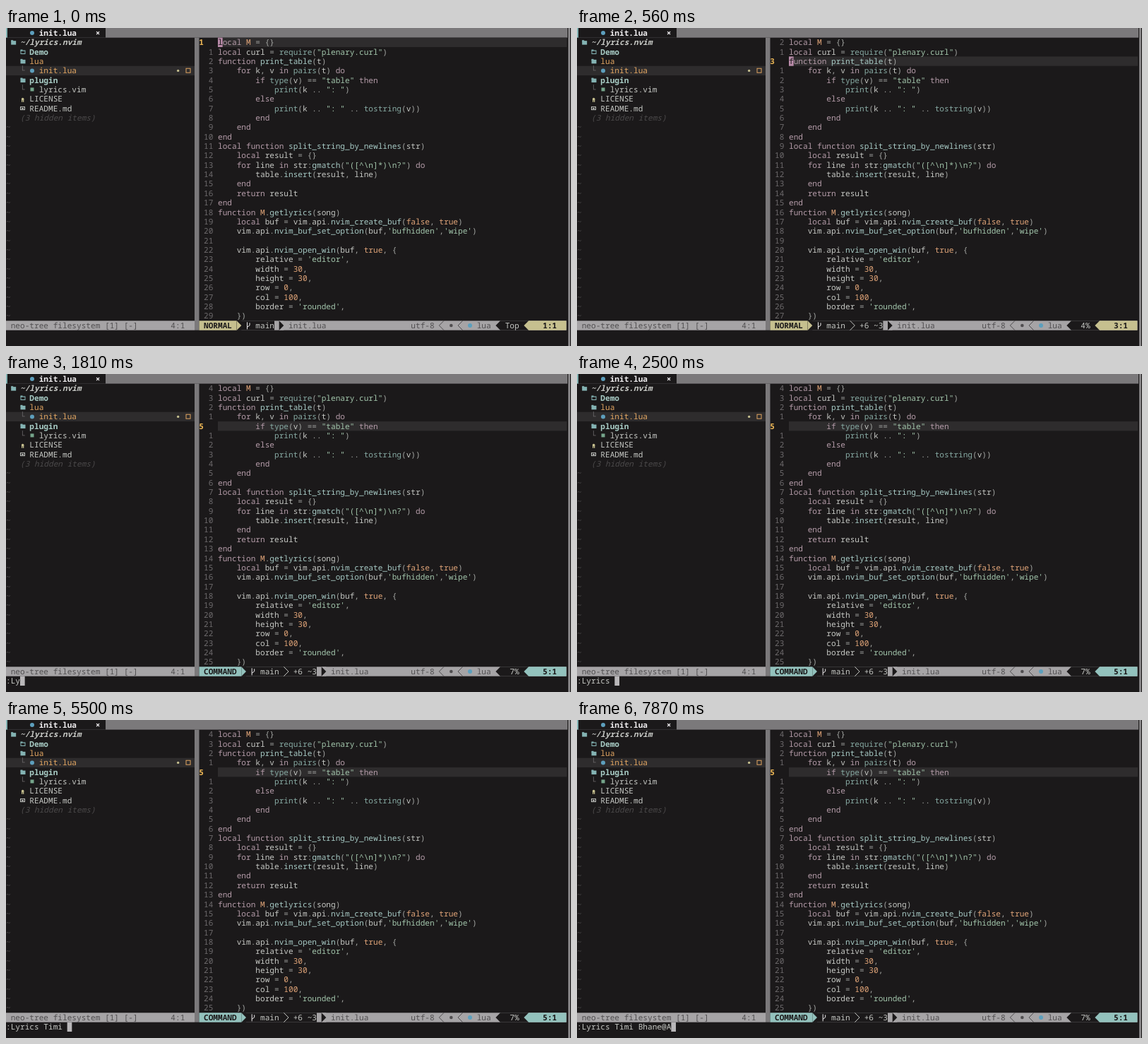
An HTML page with a canvas for the animation above (8 s loop, 800 px wide and 450 px high).

```html
<!DOCTYPE html>
<html lang="en">
<head>
<meta charset="utf-8">
<title>Editor session</title>
<style>
html, body { margin: 0; width: 100%; height: 100%; overflow: hidden; background: #1b191a; }
canvas { display: block; }
</style>
</head>
<body>
<canvas id="stage" width="800" height="450"></canvas>
<script>
const ctx = document.getElementById('stage').getContext('2d');
const CW = 20 / 3, RH = 13.355, LOOP = 8000;
const C = {
  bg: '#1b191a', line: '#2e2c2d', tabs: '#7b797b', bar: '#a6a4a6', barText: '#504e50',
  fg: '#c6c8c4', dim: '#6d6a6c', faint: '#4b494a', white: '#f0eef0', teal: '#84b3b3',
  dir: '#a9cdc6', orange: '#e2a662', keyword: '#b59ca9', string: '#a2c5ab', number: '#e0a478',
  func: '#a6c9c4', builtin: '#86a9a2', op: '#a3a5a2', khaki: '#c6c08f', command: '#93c2bd',
  cursor: '#b9b7b9', mauve: '#b98ba9', blue: '#5d9fbd', green: '#76a58b'
};

const code = `local M = {}
local curl = require("plenary.curl")
function print_table(t)
    for k, v in pairs(t) do
        if type(v) == "table" then
            print(k .. ": ")
        else
            print(k .. ": " .. tostring(v))
        end
    end
end
local function split_string_by_newlines(str)
    local result = {}
    for line in str:gmatch("([^\\n]*)\\n?") do
        table.insert(result, line)
    end
    return result
end
function M.getlyrics(song)
    local buf = vim.api.nvim_create_buf(false, true)
    vim.api.nvim_buf_set_option(buf,'bufhidden','wipe')

    vim.api.nvim_open_win(buf, true, {
        relative = 'editor',
        width = 30,
        height = 30,
        row = 0,
        col = 100,
        border = 'rounded',
    })`.split('\n');

const tokenRules = [
  [/^(["']).*?\1/, C.string],
  [/^(local|function|for|in|do|if|then|else|end|return)\b/, C.keyword],
  [/^(\d+|true|false|M)\b/, C.number],
  [/^(require|pairs|type|tostring|print)(?=\()/, C.builtin],
  [/^\w+(?=\()/, C.func],
  [/^\w+/, C.fg],
  [/^[^\w\s"']/, C.op]
];

// Time and number of characters shown in the command line
const command = ':Lyrics Timi Bhane@A';
const typed = [[870, 1], [1310, 2], [1810, 3], [1930, 4], [2120, 7], [2500, 8], [4180, 9],
  [4370, 10], [4620, 11], [4810, 12], [5500, 13], [5870, 14], [6060, 15], [6250, 16],
  [6370, 17], [6500, 18], [7310, 19], [7870, 20]];
const cursorLines = [[0, 1], [60, 2], [560, 3], [620, 5]];
const percent = { 1: 'Top', 2: ' 3%', 3: ' 4%', 5: ' 7%' };

const at = (steps, t) => steps.reduce((value, [time, v]) => t >= time ? v : value, steps[0][0] ? 0 : steps[0][1]);
const rowY = row => row * RH + 0.3;

function rect(x, y, w, h, color) {
  ctx.fillStyle = color;
  ctx.fillRect(x, y, w, h);
}
function cells(col, row, count, color) {
  rect(col * CW, rowY(row), count * CW, RH, color);
}
function text(str, col, row, color, style = '') {
  ctx.font = `${style} 11.11px "Noto Sans Mono", "DejaVu Sans Mono", monospace`;
  ctx.fillStyle = color;
  ctx.fillText(str, col * CW, rowY(row) + 10.5);
}
function path(points, color, fill) {
  ctx.beginPath();
  points.forEach(([x, y]) => ctx.lineTo(x, y));
  ctx.fillStyle = ctx.strokeStyle = color;
  fill ? ctx.fill() : ctx.stroke();
}
// dir: 1 points right, -1 points left
function chevron(col, dir, color, fill) {
  const x = (col + (dir < 0 ? 1 : 0)) * CW, y = rowY(31);
  path([[x, y], [x + dir * CW, y + RH / 2], [x, y + RH]], color, fill);
}
function dot(col, row, color, r = 3) {
  ctx.fillStyle = color;
  ctx.beginPath();
  ctx.arc((col + 0.55) * CW, rowY(row) + RH / 2, r, 0, 7);
  ctx.fill();
}
function folder(col, row, open) {
  const x = col * CW + 0.5, y = rowY(row) + 3.5;
  rect(x, y, 3, 2, C.teal);
  rect(x, y + 1, 7, 5.5, C.teal);
  if (open) rect(x + 1, y + 2.2, 5, 3.2, C.bg);
}

function drawTabs() {
  rect(0, 0, 795, rowY(1), C.tabs);
  rect(0, 0, 141, rowY(1), C.bg);
  rect(0, 0, 2, rowY(1), C.teal);
  dot(5, 0, C.blue);
  text('init.lua', 7, 0, C.white, 'bold');
  text('×', 19, 0, C.white, 'bold');
}

function drawTree() {
  folder(1, 1);
  text('~/lyrics.nvim', 3, 1, C.fg, 'italic bold');
  folder(3, 2, true);
  text('Demo', 5, 2, C.dir, 'bold');
  folder(3, 3);
  text('lua', 5, 3, C.orange);
  rect(0, rowY(4), 267, RH, C.line);
  text('└', 3, 4, C.dim);
  dot(5, 4, C.blue);
  text('init.lua', 7, 4, C.orange);
  dot(36, 4, C.khaki, 1.7);
  ctx.strokeStyle = C.orange;
  ctx.strokeRect(255, rowY(4) + 3.5, 6, 6);
  folder(3, 5);
  text('plugin', 5, 5, C.dir, 'bold');
  text('└', 3, 6, C.dim);
  rect(34.5, rowY(6) + 4, 5, 5, C.green);
  text('lyrics.vim', 7, 6, C.fg);
  dot(3, 7, C.khaki, 1.8);
  rect(22, rowY(7) + 7, 1.3, 4, C.khaki);
  rect(24, rowY(7) + 7, 1.3, 4, C.khaki);
  text('LICENSE', 5, 7, C.fg);
  ctx.strokeStyle = C.fg;
  ctx.strokeRect(20.5, rowY(8) + 4.5, 6, 4);
  rect(22, rowY(8) + 6, 3, 1.5, C.fg);
  text('README.md', 5, 8, C.fg);
  text('(3 hidden items)', 3, 9, C.faint, 'italic');
  for (let row = 10; row < 31; row++) text('~', 0, row, C.faint);
  rect(267, rowY(1), 6.5, RH * 31, C.tabs);
}

function drawCode(current, commandMode) {
  rect(300, rowY(current), 494, RH, C.line);
  code.forEach((line, i) => {
    const row = i + 1, offset = Math.abs(row - current);
    if (offset) text(String(offset).padStart(2), 42, row, C.dim);
    else text(String(row), 41, row, '#eab555', 'bold');
    let col = 0;
    while (col < line.length) {
      const rest = line.slice(col);
      let size = 1;
      for (const [rule, color] of tokenRules) {
        const match = rest.match(rule);
        if (!match) continue;
        size = match[0].length;
        text(match[0], 45 + col, row, color);
        break;
      }
      col += size;
    }
  });
  if (commandMode) return;
  const under = code[current - 1][0];
  cells(45, current, 1, under === ' ' ? C.cursor : C.mauve);
  text(under, 45, current, C.bg);
}

function drawStatus(current, commandMode) {
  const accent = commandMode ? C.command : C.khaki;
  const mode = commandMode ? 'COMMAND' : 'NORMAL';
  const changed = current > 1;
  let col = 42 + mode.length;

  rect(0, rowY(31), 267, RH, C.bar);
  text('neo-tree filesystem [1] [-]', 1, 31, C.barText);
  text('4:1', 35, 31, C.barText);

  rect(273.5, rowY(31), 520, RH, C.bar);
  rect(273.5, rowY(31), (col + (changed ? 17 : 9)) * CW - 273.5, RH, C.bg);
  rect(273.5, rowY(31), (col + 1) * CW - 273.5, RH, accent);
  text(mode, 42, 31, C.bg, 'bold');
  col++;
  cells(col, 31, 1, C.bg);
  chevron(col, 1, accent, true);

  const x = (col + 2) * CW, y = rowY(31);
  path([[x + 1.5, y + 2], [x + 1.5, y + 12]], C.white);
  path([[x + 1.5, y + 9], [x + 5, y + 6.5], [x + 5, y + 3]], C.white);
  text('main', col + 4, 31, C.fg);
  if (changed) {
    chevron(col + 9, 1, C.fg);
    text('+6 ~3', col + 11, 31, C.fg);
    col += 8;
  }
  cells(col + 9, 31, 1, C.bar);
  chevron(col + 9, 1, C.bg, true);
  text('init.lua', col + 11, 31, C.barText);

  text('utf-8', 86, 31, C.barText);
  chevron(92, -1, C.barText);
  dot(94, 31, C.barText, 2.3);
  chevron(96, -1, C.barText);
  dot(98, 31, C.blue);
  text('lua', 100, 31, C.barText);
  chevron(104, -1, C.bg, true);
  cells(105, 31, 6, C.bg);
  text(percent[current], 106, 31, C.fg);
  chevron(110, -1, accent, true);
  cells(111, 31, 8, accent);
  text(current + ':1', 114, 31, C.bg, 'bold');
}

function drawCommand(count) {
  if (!count) return;
  text(command.slice(0, count), 0, 32, C.fg);
  cells(count, 32, 1, C.cursor);
}

function draw(now) {
  const t = now % LOOP;
  const current = at(cursorLines, t), count = at(typed, t);
  ctx.textRendering = 'geometricPrecision';
  ctx.lineWidth = 1;
  rect(0, 0, 800, 450, C.bg);
  drawTabs();
  drawTree();
  drawCode(current, count > 0);
  drawStatus(current, count > 0);
  drawCommand(count);
  rect(796, 0, 3, 450, '#858385');
}
function tick(now) {
  draw(now);
  requestAnimationFrame(tick);
}
draw(0);
requestAnimationFrame(tick);
</script>
</body>
</html>
```
